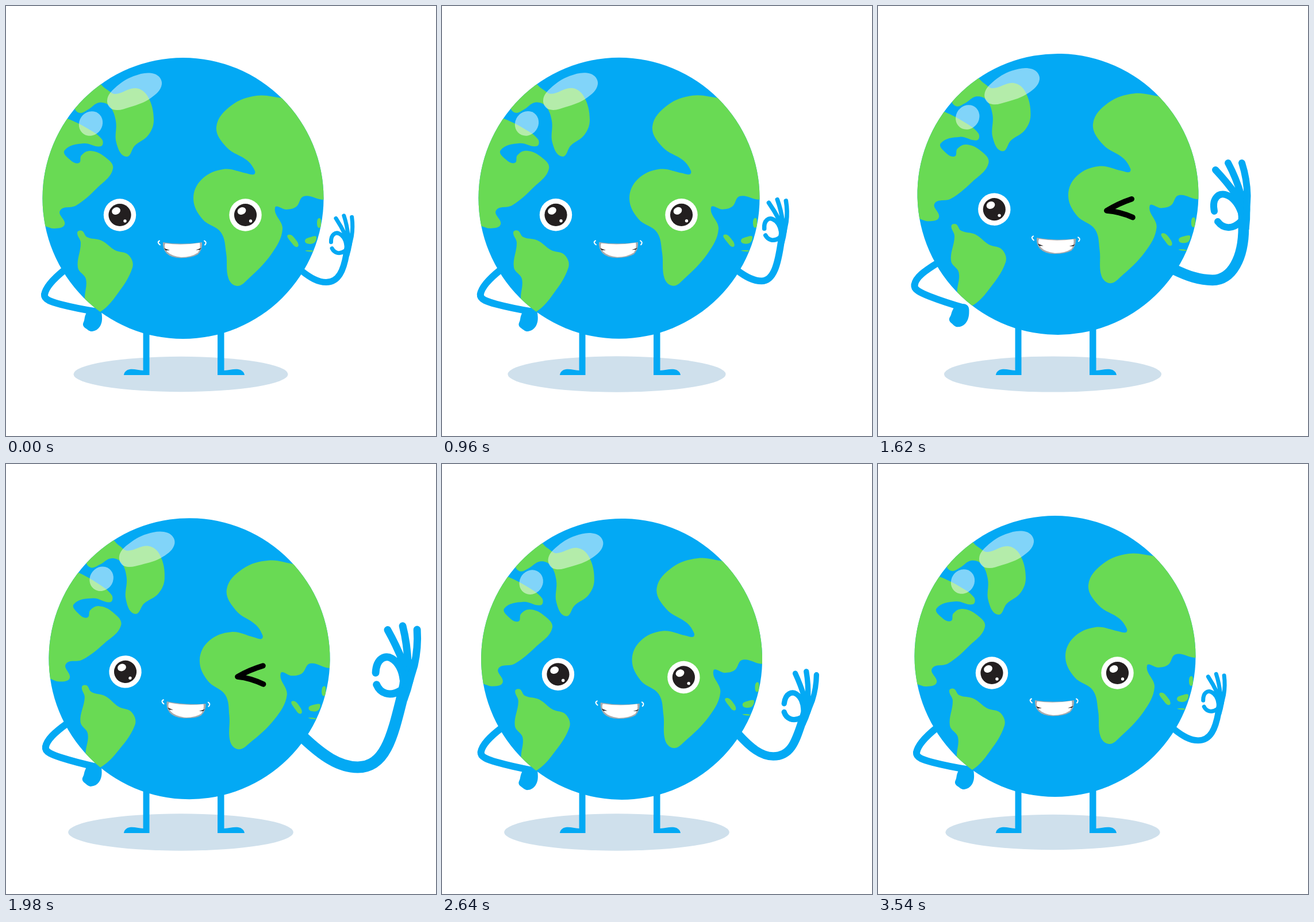
Recreate the animation shown at these times as an HTML page with a canvas. Size 748 by 748 pixels, loop 3600 ms.

```html
<!DOCTYPE html>
<html lang="en">
<head>
<meta charset="utf-8">
<title>Cheerful globe</title>
<style>
html, body { margin: 0; width: 100%; height: 100%; overflow: hidden; background: #fff; }
canvas { display: block; width: 748px; height: 748px; }
</style>
</head>
<body>
<canvas id="stage" width="748" height="748"></canvas>
<script>
const ctx = document.getElementById('stage').getContext('2d');
const LOOP = 3600, STEP = 60, RAD = Math.PI / 180;
const BLUE = '#03a9f4', GREEN = '#69da54', SHADE = '#cfe0ec', INK = '#231f20', SHINE = 'rgba(255,255,255,.5)';
const HOME = { x: 308, y: 334.5, r: 244.5 };

// Hand poses: wrist x, wrist y, turn, scale.
const REST = [592, 432, 10, 0.585];
const SWAY = [598, 461, 25, 0.57];
const RAISE = [584, 370, -4.5, 0.74];
const SHOW = [636, 385, 0, 1];
const REACH = [690, 402, 14, 1.08];
const SETTLE = [655, 435, 14, 0.97];
const HAND = [[0, REST], [600, SWAY], [1260, RAISE], [1620, SHOW],
  [1920, REACH], [2400, SETTLE], [2940, SWAY], [3600, REST]];

const winking = t => t >= 1440 && t < 2160;

// Closed smooth curve through a few points.
function blob(text) {
  const pts = text.split(' ').map(p => p.split(',').map(Number)), n = pts.length;
  const at = i => pts[(i + n) % n];
  const handle = (i, j) => {
    const [px, py] = at(i - 1), [qx, qy] = at(i + 1), [x, y] = at(i), [ox, oy] = at(j);
    const k = (j - i) * 0.36 * Math.hypot(ox - x, oy - y) / Math.hypot(qx - px, qy - py);
    return [x + (qx - px) * k, y + (qy - py) * k];
  };
  const path = new Path2D();
  path.moveTo(...at(0));
  for (let i = 0; i < n; i++) path.bezierCurveTo(...handle(i, i + 1), ...handle(i + 1, i), ...at(i + 1));
  return path;
}

const LAND = [
  '60,180 107,196 140,212 167,232 165,244 135,239 102,251 112,268 127,273 131,260 146,252 170,261 186,283 158,317 122,347 94,356 102,380 85,387 68,383 20,370',
  '120,176 128,186 143,180 162,168 180,174 191,200 192,238 209,262 224,243 248,224 257,198 247,158 226,143 190,153 175,145 150,130',
  '124,394 132,391 141,402 166,408 190,425 213,433 220,455 190,506 164,532 138,540 137,507 139,475 125,455 130,412',
  '482,160 436,156 392,173 366,210 384,246 420,269 433,287 431,293 418,291 378,284 340,302 326,336 342,371 374,394 383,430 387,474 402,487 420,476 462,431 481,388 468,351 488,354 505,349 518,331 552,337 590,330 580,165',
  '491,398 506,409 507,419 497,412',
  '520,409 533,401 540,402 534,413',
  '545,369 548,378 545,386 541,378',
  '521,426 530,425 536,427'
].map(blob);

const GLARE = blob('176,164 186,180 215,176 252,160 271,136 258,118 222,122 189,143');
const LEG = new Path2D('M0 -100L0 0L47 0Q46 -6 40 -9C32 -12 22 -9 11.500 -8L11.500 -100Z');
const FOREARM = new Path2D('M0 0C-1 9 13 13 28 17Q55 24 92 30');
const FIST = blob('94,24 100,38 96,56 83,64 72,59 67,53 69,45 71,36 76,28');
const FINGERS = new Path2D('M-49 -100Q-30 -80 -12 -55M-27 -112Q-13 -86 -4 -55M-3 -112Q6 -84 6.500 -55L5 -25');
const PINCH = new Path2D('M-51 -28C-56 -52 -42 -60 -32 -57C-20 -54 -10 -42 -5 -28M-45 -10C-36 2 -20 5 -5 -10');
const PALM = new Path2D('M-24 -60L8 -64Q14 -32 9.500 4L-9 4L-10 -8Q-6 -30 -24 -56Z');
const LIPS = new Path2D('M273 411Q306 416 341 411Q342 424 334 432Q324 438 304 438.500Q287 438 279 430Q272 422 273 411Z');
const TEETH = new Path2D('M277 413Q306 417 337 412Q339 420 334 429Q322 437 305 437Q288 435 281 428Q274 420 277 413Z');
const CREASES = new Path2D('M275 421.500L285 425L278 425ZM340 421L330 424.500L337 424Z');
const CHEEKS = new Path2D('M267 408.500Q262 411 268 415.500M345 408.500Q350 411 346 415.500');
const WINK_LINE = new Path2D('M436.500 339.500Q413 348 393.500 361Q416 362 439 371.500');

// Smooth step from 0 to 1 between two times.
function ease(t, from, to) {
  const u = Math.min(1, Math.max(0, (t - from) / (to - from)));
  return u * u * (3 - 2 * u);
}

const pulse = (t, from, peak, to) => ease(t, from, peak) - ease(t, peak, to);

// Passes through every pose at an even pace, without overshooting.
function poseAt(keys, t) {
  let i = 0;
  while (i < keys.length - 2 && t >= keys[i + 1][0]) i++;
  const [ta, a] = keys[i], [tb, b] = keys[i + 1], span = tb - ta, u = (t - ta) / span, w = 1 - u;
  const slope = (k, c) => keys[k] && keys[k + 1]
    ? (keys[k + 1][1][c] - keys[k][1][c]) / (keys[k + 1][0] - keys[k][0]) : 0;
  const tangent = (k, c) => {
    const p = slope(k - 1, c), q = slope(k, c);
    return p * q > 0 ? 2 * p * q / (p + q) : 0;
  };
  return a.map((v, c) => v * (1 + 2 * u) * w * w + b[c] * u * u * (3 - 2 * u)
    + span * u * w * (tangent(i, c) * w - tangent(i + 1, c) * u));
}

function bodyAt(t) {
  const dip = pulse(t, 0, 600, 1000) + ease(t, 1600, 2100) - ease(t, 2700, 3300);
  const rise = pulse(t, 930, 1300, 1860);
  const lean = pulse(t, 960, 1300, 1720);
  const offer = ease(t, 1400, 1740);
  const reach = offer - ease(t, 2340, 2880);
  const spread = pulse(t, 0, 600, 1200) + offer - ease(t, 2880, 3600);
  return {
    x: HOME.x - 20 * lean + 11 * reach,
    y: HOME.y + 4.9 * dip - 18 * rise,
    tilt: 3.25 * reach - 6.2 * lean,
    swing: rise,
    shadow: 186.5 + 9.3 * spread - 10.5 * rise
  };
}

function ellipse(x, y, rx, ry, color, turn = 0) {
  ctx.fillStyle = color;
  ctx.beginPath();
  ctx.ellipse(x, y, rx, ry, turn * RAD, 0, 2 * Math.PI);
  ctx.fill();
}

function fill(path, color) {
  ctx.fillStyle = color;
  ctx.fill(path);
}

function stroke(path, color, width) {
  ctx.strokeStyle = color;
  ctx.lineWidth = width;
  ctx.stroke(path);
}

function placed(x, y, turn, sx, sy, draw) {
  ctx.save();
  ctx.translate(x, y);
  ctx.rotate(turn * RAD);
  ctx.scale(sx, sy);
  draw();
  ctx.restore();
}

// Point fixed to the globe, given relative to its centre.
function onGlobe(body, x, y) {
  const c = Math.cos(body.tilt * RAD), s = Math.sin(body.tilt * RAD);
  return [body.x + x * c - y * s, body.y + x * s + y * c];
}

function leftArm(body) {
  const [sx, sy] = onGlobe(body, -206, 124.5);
  const [ex, ey] = onGlobe(body, -241 - 11 * body.swing, 167.5 - 10 * body.swing);
  const upper = new Path2D();
  upper.moveTo(sx, sy);
  upper.bezierCurveTo(sx + (ex - sx) * 0.55, sy + (ey - sy) * 0.36, ex + 2, ey - 13, ex, ey);
  stroke(upper, BLUE, 12);
  placed(ex, ey, body.tilt + 13.8 * body.swing, 1, 1, () => {
    stroke(FOREARM, BLUE, 12);
    fill(FIST, BLUE);
  });
}

function rightArm(body, t) {
  const [wx, wy, turn, scale] = poseAt(HAND, t);
  const [sx, sy] = onGlobe(body, 206, 126);
  const width = wx - sx, bx = sx + width * 0.55;
  const drop = width * (0.152 + 0.0105 * turn), by = sy + drop;
  const reach = (by - wy) * 0.58, a = turn * RAD;
  const arm = new Path2D();
  arm.moveTo(sx, sy);
  arm.bezierCurveTo(sx + width * 0.19, sy + drop * 0.6, bx - width * 0.19, by, bx, by);
  arm.bezierCurveTo(bx + width * 0.28, by, wx - Math.sin(a) * reach, wy + Math.cos(a) * reach, wx, wy);
  stroke(arm, BLUE, 18.7 * scale);
  placed(wx, wy, turn, scale, scale, () => {
    fill(PALM, BLUE);
    stroke(FINGERS, BLUE, 12);
    stroke(PINCH, BLUE, 12);
  });
}

function eye(x, lid) {
  placed(x, 363.5, 0, 1, lid, () => {
    ellipse(0, 0, 28.2, 28.2, '#fff');
    ellipse(0, 0, 19.6, 19.6, INK);
    ellipse(-6.5, -7, 7.6, 6.2, '#fff', -25);
    ellipse(9, 10.5, 2.7, 2.7, '#fff');
  });
}

function face(t) {
  const lid = 1 - 0.74 * Math.max(0, 1 - Math.abs(t - 2940) / 120);
  eye(198, lid);
  if (winking(t)) stroke(WINK_LINE, '#000', 9.5);
  else eye(416.5, lid);
  fill(LIPS, '#a9abae');
  fill(TEETH, '#fff');
  fill(CREASES, INK);
  stroke(CHEEKS, '#fff', 2);
}

function globe(body, t) {
  placed(body.x, body.y, body.tilt, 1, 1, () => {
    ctx.translate(-HOME.x, -HOME.y);
    ellipse(HOME.x, HOME.y, HOME.r, HOME.r, BLUE);
    ctx.save();
    ctx.beginPath();
    ctx.arc(HOME.x, HOME.y, HOME.r, 0, 2 * Math.PI);
    ctx.clip();
    LAND.forEach(path => fill(path, GREEN));
    ctx.restore();
    fill(GLARE, SHINE);
    ellipse(147.5, 204.5, 22, 20, SHINE, -55);
    face(t);
  });
}

function draw(t) {
  const body = bodyAt(t);
  ctx.fillStyle = '#fff';
  ctx.fillRect(0, 0, 748, 748);
  ctx.lineCap = ctx.lineJoin = 'round';
  ellipse(304, 640.5, body.shadow, body.shadow * 0.1645, SHADE);
  placed(249.5, 642, 0, -0.95, 1, () => fill(LEG, BLUE));
  placed(368, 642, 0, 1, 1, () => fill(LEG, BLUE));
  leftArm(body);
  rightArm(body, t);
  globe(body, t);
}

const start = performance.now();
function tick() {
  const t = (performance.now() - start) % LOOP;
  draw(Math.floor(t / STEP) * STEP);
  requestAnimationFrame(tick);
}
tick();
</script>
</body>
</html>
```
